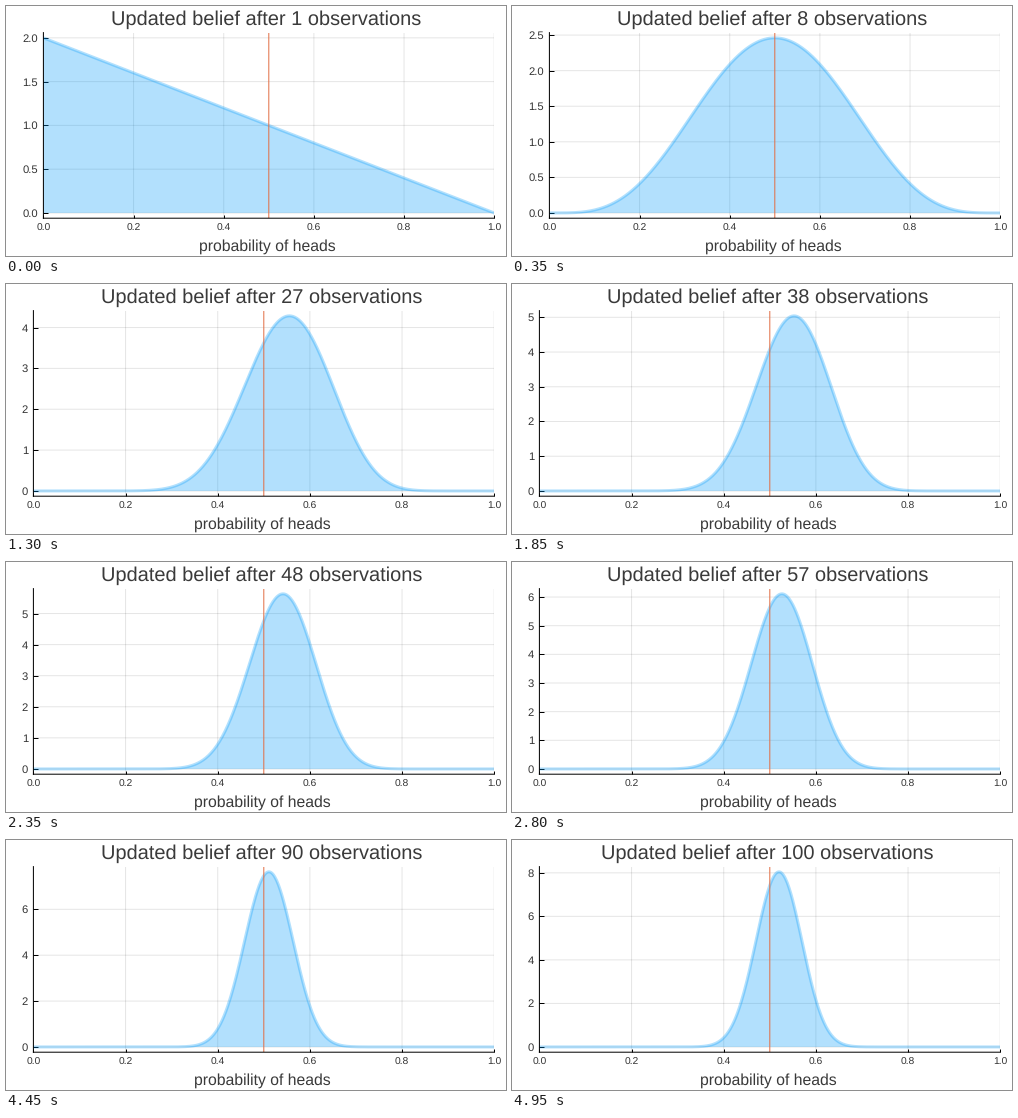
A matplotlib script that plays this animation: 500 by 250 pixels, repeating every 5 s.

```python
import math

import numpy as np
import matplotlib.pyplot as plt
from matplotlib.animation import FuncAnimation

W, H, DPI = 500, 250, 100
PX = 72 / DPI  # points per pixel
FLIPS = 100
TOP, BOTTOM, RIGHT = 26.6, 212.2, 488.2
BLUE, ORANGE, TEXT = "#009afa", "#e26f46", "#3a3a3a"

# running count of heads: (flips so far, heads so far)
TALLY = [(1, 0), (17, 9), (38, 21), (57, 30), (74, 37), (90, 46), (100, 52)]

# soft lines and evenly spaced letters, free of the pixel grid
plt.rcParams.update({
    "font.family": "Liberation Sans",
    "text.hinting": "none",
    "path.snap": False,
})

fig = plt.figure(figsize=(W / DPI, H / DPI), dpi=DPI, facecolor="white")
ax = fig.add_axes([0, 0, 1, 1])
ax.set_axisbelow(True)
ax.grid(color="black", alpha=0.1, lw=1 * PX)
ax.spines[["top", "right"]].set_visible(False)
ax.spines[["left", "bottom"]].set_linewidth(1 * PX)
ax.tick_params(direction="in", width=1 * PX, labelcolor="#333333")
ax.tick_params(axis="x", length=3 * PX, pad=5.5 * PX, labelsize=10.3 * PX)
ax.tick_params(axis="y", length=5 * PX, pad=5.5 * PX, labelsize=11.2 * PX)

x = np.linspace(0, 1, 501)
area, = ax.fill(x, x, color=BLUE, alpha=0.3, lw=0, zorder=2)
curve, = ax.plot(x, x, color=BLUE, alpha=0.3, lw=3 * PX, zorder=2.1)
ax.axvline(0.5, color=ORANGE, lw=1 * PX, zorder=2.2)
ax.set_xlim(0, 1)
ax.set_xticks(np.arange(6) / 5, [f"{i / 5:.1f}" for i in range(6)])


def label(y, size, text=""):
    return fig.text(0.5, 1 - y / H, text, fontsize=size * PX, color=TEXT,
                    ha="center", va="baseline")


title = label(19, 20.05)
xlabel = label(245, 15.8, "probability of heads")


def heads_after(n):
    return int(math.floor(np.interp(n, *zip(*TALLY)) + 0.5))


def posterior(n):
    """Density of Beta(1 + heads, 1 + tails)."""
    h = heads_after(n)
    return (n + 1) * math.comb(n, h) * x**h * (1 - x) ** (n - h)


def tick_step(limit):
    if limit < 3:
        return 0.5
    return 1 if limit < 7 else 2


def update(i):
    n = i + 1
    y = posterior(n)
    peak = y.max()
    limit = 1.03 * peak
    step = tick_step(limit)

    # decimal labels need a wider left margin
    left = 37.4 if step < 1 else 27.4
    ax.set_position([left / W, 1 - BOTTOM / H,
                     (RIGHT - left) / W, (BOTTOM - TOP) / H])
    ax.set_ylim(-0.03 * peak, limit)
    ticks = np.arange(0, limit, step)
    ax.set_yticks(ticks, [f"{t:.{1 if step < 1 else 0}f}" for t in ticks])

    curve.set_ydata(y)
    area.set_xy(np.column_stack([np.r_[0, x, 1], np.r_[0, y, 0]]))

    center = (left + RIGHT) / 2
    title.set_text(f"Updated belief after {n} observations")
    title.set_x((center - 2.3) / W)
    xlabel.set_x((center - 1.2) / W)
    return curve, area, title, xlabel


anim = FuncAnimation(fig, update, frames=FLIPS, interval=50,
                     repeat=True, repeat_delay=0, blit=False)
plt.show()
```
